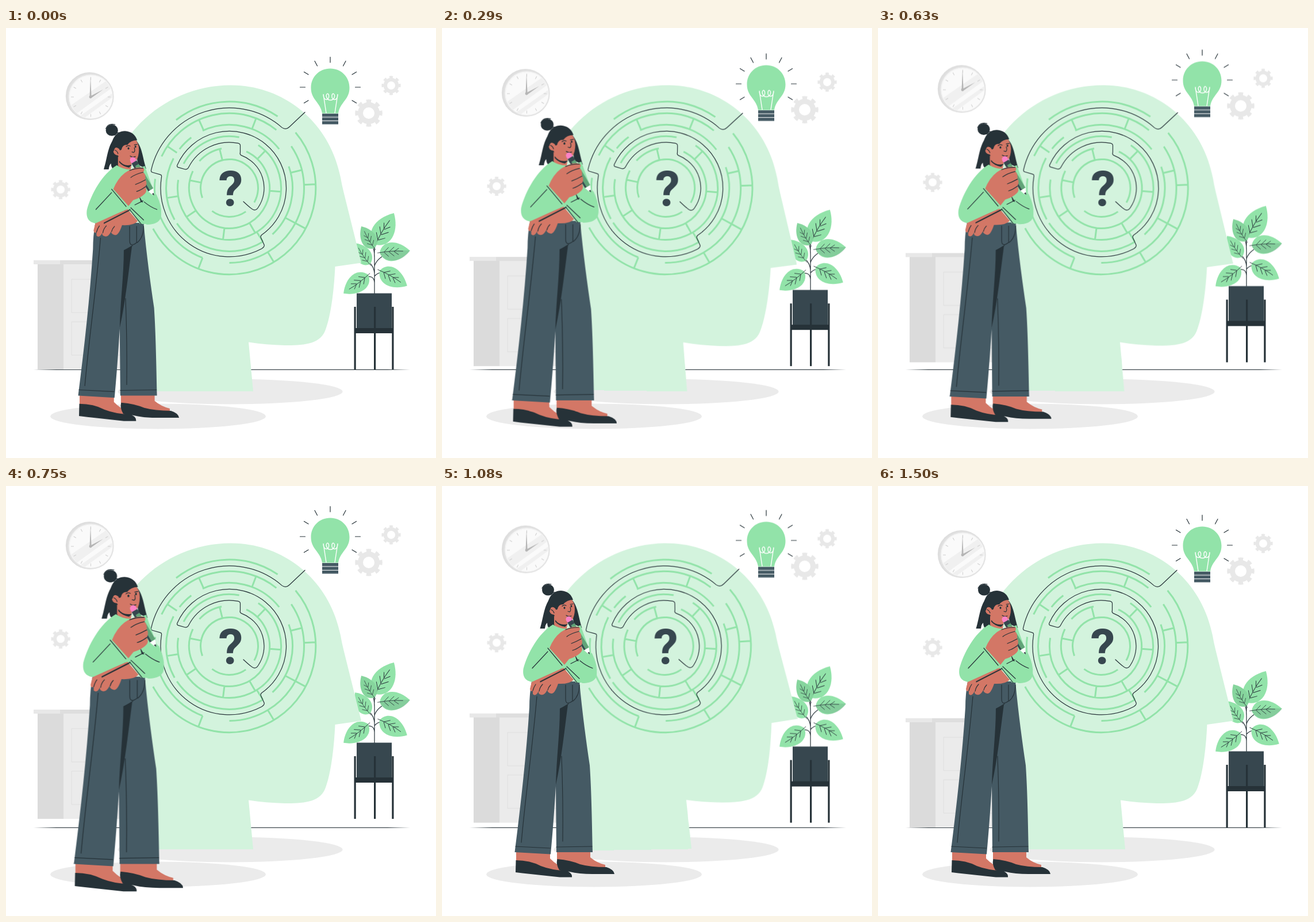
An HTML page that plays this animation: 748 px wide and 748 px high, repeating every 1540 ms.

```html
<!DOCTYPE html>
<html lang="en">
<head>
<meta charset="utf-8">
<title>Thinking through a maze</title>
<style>
html, body { margin: 0; width: 100%; height: 100%; overflow: hidden; background: #fff; }
svg { display: block; width: 100vw; height: 100vh; }

/* 37 pictures per loop; steps() keeps each one still */
.float, .sway, .beat { animation: 1540ms -5ms infinite; }
.float { animation-name: float; }
.sway { animation-name: sway; transform-origin: 394px 366px; }
.beat { animation-name: beat; transform-origin: 214px 427px; }
@keyframes float {
  0% { transform: translateY(0); animation-timing-function: steps(18); }
  48.649% { transform: translateY(-15px); animation-timing-function: steps(18); }
  97.297%, 100% { transform: translateY(0); }
}
@keyframes sway {
  0% { transform: rotate(0deg); animation-timing-function: steps(9); }
  24.324% { transform: rotate(1deg); animation-timing-function: steps(18); }
  72.973% { transform: rotate(-1deg); animation-timing-function: steps(9); }
  97.297%, 100% { transform: rotate(0deg); }
}
@keyframes beat {
  0% { transform: scale(1.012); animation-timing-function: steps(1); }
  2.703% { transform: scale(1.03); animation-timing-function: steps(2); }
  8.108% { transform: scale(1.086); animation-timing-function: steps(1); }
  10.811% { transform: scale(1.0931); animation-timing-function: steps(6); }
  27.027% { transform: scale(1.0097); animation-timing-function: steps(1); }
  29.73% { transform: scale(1); }
  37.838% { transform: scale(1); animation-timing-function: steps(1); }
  40.541% { transform: scale(1.0193); animation-timing-function: steps(2); }
  45.946% { transform: scale(1.075); animation-timing-function: steps(1); }
  48.649% { transform: scale(1.0973); animation-timing-function: steps(3); }
  56.757% { transform: scale(1.014); animation-timing-function: steps(1); }
  59.459%, 100% { transform: scale(1); }
}

.ink { fill: #263238; }
.slate { fill: #37474f; }
.denim { fill: #455a64; }
.green { fill: #92e3a9; }
.skin { fill: #d37766; }
.pale { fill: #ebebeb; }
.line { fill: none; stroke: #263238; stroke-width: 1.2; stroke-linecap: round; stroke-linejoin: round; }
.wall { fill: none; stroke: #92e3a9; stroke-width: 3; }
.gear { fill: none; stroke: #e8e8e8; }
.leaf .line { stroke-width: .9; }
text { font: 700 86px Roboto, "Open Sans", sans-serif; text-anchor: middle; }
</style>
</head>
<body>
<svg viewBox="0 0 748 748" xmlns="http://www.w3.org/2000/svg">
<defs>
  <g id="gear" class="gear">
    <circle r="14.5" stroke-width="9"/>
    <circle r="20.5" stroke-width="6.6" pathLength="16" stroke-dasharray="1 1" transform="rotate(-11.25)"/>
  </g>
  <g id="leaf" class="leaf">
    <path d="M0 0C6 -24 36 -25 60 0C38 23 8 24 0 0Z"/>
    <path class="line" d="M-4 0Q24 -3 46 0M9 -1L18 -9M19 -1L29 -9M29 -1L38 -6M9 0L17 8M19 0L28 8M29 0L37 6"/>
  </g>
  <linearGradient id="floor">
    <stop offset="0" stop-color="#263238" stop-opacity="0"/>
    <stop offset=".06" stop-color="#263238"/>
    <stop offset=".94" stop-color="#263238"/>
    <stop offset="1" stop-color="#263238" stop-opacity="0"/>
  </linearGradient>
  <clipPath id="face"><circle cx="148" cy="120" r="37"/></clipPath>
</defs>

<rect x="48" y="593.8" width="655" height="1.1" fill="url(#floor)"/>

<g class="float">
  <path class="pale" d="M100 411H206V594H100Z"/>
  <path fill="#dbdbdb" d="M55 411H100V594H55Z"/>
  <path fill="#e8e8e8" d="M48 404H94V411H48Z"/>
  <path fill="#dedede" d="M94 404H206V411H94Z"/>
  <path fill="none" stroke="#dedede" d="M114 437H200V495H114ZM114 511H200V569H114Z"/>

  <use href="#gear" x="631" y="148"/>
  <use href="#gear" transform="translate(670 100) scale(.7)"/>
  <use href="#gear" transform="translate(95 281) scale(.7)"/>

  <circle cx="145.3" cy="118.5" r="41.5" fill="#dedede"/>
  <circle cx="147.7" cy="119.5" r="39" fill="#f5f5f5"/>
  <circle cx="148" cy="120" r="37" fill="#fafafa"/>
  <path clip-path="url(#face)" fill="#f0f0f0" d="M105 140L180 88L190 100L114 155ZM119 160L190 110V117L126 164Z"/>
  <circle cx="147.5" cy="119.5" r="39.2" fill="none" stroke="#e3e3e3" stroke-width="2"/>
  <circle cx="147.5" cy="120" r="32" fill="none" stroke="#d0d0d0" stroke-width="5" pathLength="120" stroke-dasharray=".6 9.4" stroke-dashoffset=".3"/>
  <path fill="#b5b5b5" d="M145.5 121L147 84L148.7 121ZM146 119L169 107L148 122Z"/>
  <circle cx="147" cy="120" r="2.4" fill="#b5b5b5"/>

  <path class="green" d="M564 70.5C583 70.5 597.5 85 597.5 104C597.5 125 581 129 578 148.5H550C547 129 530.5 125 530.5 104C530.5 85 545 70.5 564 70.5Z"/>
  <path fill="none" stroke="#fff" stroke-width="1.4" d="M552 115L557 148M577 115L572 148M552 117C553 128 563 126 561.5 117C560 111 555.500 116 558 121C560 127 568.500 127 571 121C573 116 568.500 111 567 117C565.500 126 576 128 577 117"/>
  <path class="denim" d="M550 149H578V154.500H550ZM550 155.500H578V161H550ZM550 162H578V167.500H550Z"/>
  <path class="line" stroke-width="1.500" d="M564 50.500V60M537 57.500L541.500 66M591 57.500L586.500 66M518.500 76.500L526 81M609.500 76.500L602 81M511.500 103H520.500M616.500 103H607.500M518.500 130.500L526 126M609.500 130.500L602 126"/>

  <path class="line" stroke-width="1.7" d="M641 462V400Q640 388 643 372M641 398Q641 386 637 377M641 414Q645 400 668 390M641 427Q640 415 632 408M641 432Q648 423 660 426M641 443Q640 428 622 434"/>
  <g class="green">
    <use href="#leaf" transform="translate(643 377) rotate(-60) scale(1.06)"/>
    <use href="#leaf" transform="translate(641 383) rotate(-121) scale(.74)" fill="#86d59d"/>
    <use href="#leaf" transform="translate(650 391) rotate(-4) scale(.88 .9)"/>
    <use href="#leaf" transform="translate(633 411) rotate(-125) scale(.75)"/>
    <use href="#leaf" transform="translate(650 422) rotate(29) scale(.91)"/>
    <use href="#leaf" transform="translate(630 429) rotate(142.5) scale(.9)"/>
  </g>
  <path fill="#263238" fill-opacity=".12" d="M650 391Q676 386 703 387C690 408 660 411 650 391Z"/>
  <path class="slate" d="M610 461.5H671V523H610Z"/>
  <path class="ink" d="M606 522H674.5V531H606ZM605.5 485H608.7V594H605.5ZM640 485H643.2V594H640ZM671.3 485H674.5V594H671.3Z"/>
</g>

<ellipse class="pale" cx="390" cy="632.5" rx="195.5" ry="22"/>
<ellipse class="pale" cx="264.5" cy="675.5" rx="187.5" ry="22"/>

<g class="sway">
  <path fill="#d3f3dd" d="M391 99.5C480 99.5 562 160 582 260Q584 272 587 284L618 408.5L572.5 415C571 450 566 500 555 527C545 551 515 552 485 552Q450 551 422 546.5L430 632H215V480C180 430 170 380 170 321C170 199 269 99.5 391 99.5Z"/>
  <path id="maze" class="wall"/>
  <path id="route" class="line"/>
  <text class="slate" x="391" y="310">?</text>
</g>

<g class="beat">
  <path class="ink" d="M191 192C177 206 177 228 170.5 248H179Q180 240 183 238Q183 245 187 247L200 243L203 205ZM224 196C237 208 237 228 243.500 247L229 240Z"/>
  <ellipse class="ink" cx="184.500" cy="180.800" rx="10.500" ry="9.800"/>
  <path class="line" stroke-width="1" d="M174 178Q178 168 190 171M190 189Q193 184 197 185"/>

  <path class="skin" d="M129 636H188V648Q200 660 212 664V670H129ZM200 634H258V646Q270 656 284 659V668H200Z"/>
  <path class="ink" d="M128.500 651Q153 651 172 661Q190 668 214 669Q227 672 226 680.500H205L140 673.500L128 672ZM200.500 649Q224 651 240 658Q258 663 286 663Q299 667 300 675H262Q238 675 222 671L204 668Q198 658 200.500 649Z"/>

  <path class="denim" d="M156 340H239C244 395 251 445 257 486C260 530 261 590 262 637H199L198 522C195 570 192 608 189 640.500L126.500 637C137 555 147 465 152 385Q152 362 156 340Z"/>
  <path class="ink" d="M205 387L219 380C213 425 208 475 198 520C199 475 205 430 205 387Z"/>
  <path class="line" stroke-width="1" d="M165 366C158 450 145 540 138 620M128 627L188 630M199 628L261 627M208 470Q211 550 210 618M215 346V370Q215 383 227 374V346M206 388L220 379M239 346Q239 365 228 374"/>

  <path class="skin" d="M195 226L219 235L216 253Q200 252 195 241Z"/>
  <path class="green" d="M193 241C168 256 149 290 141.500 318C139 337 150 343 171 341L218 320L244 343C262 343 271 336 269 322C268 307 264 295 257 287L241 242Q213 255 193 241Z"/>
  <path class="skin" d="M156 341L211 316L229 337Q222 345 202 344Q196 362 190 361Q184 360 183 355Q178 365 172 363Q167 362 168 357Q163 367 158 362V356Q154 359 153 353Z"/>
  <path class="line" stroke-width=".9" d="M169 357Q170 350 175 345M184 355Q185 350 189 346M158 356Q160 349 163 345"/>
  <path class="green" d="M212 314L217 302L261 291Q271 312 269 326Q268 337 246 342H233Z"/>
  <path class="ink" d="M231 293L238 305L234 304Z"/>
  <path class="line" d="M215 317L235 342M217 314L239 335M240 304Q251 313 262 317M171 341L214 319M181 290L207 318M184 290L158 315M238 302L224 309"/>

  <path class="ink" d="M197 233Q205 244 219 240L214 245Q203 243 197 236Z"/>
  <path class="skin" d="M201 204L222 193Q231 202 231 214Q231 226 226 234Q220 241 208 237Q199 235 195 224Q186 223 187 214Q191 207 198 213Z"/>
  <path class="ink" d="M184 219C181 199 190 182 207 182Q223 183 228 198Q217 198 211 206Q203 205 201 214Q198 217 197 213Q190 207 188 216Z"/>
  <path class="line" stroke-width=".9" d="M209 209Q212 206 216 208M223 206L228 205M223 211Q225 217 222 219L219 218M190 215Q194 217 195 221M216 225Q220 228 225 226"/>
  <ellipse class="ink" cx="213" cy="212" rx="1.500" ry="2"/>
  <ellipse class="ink" cx="225" cy="209" rx="1.400" ry="2"/>

  <g transform="translate(220 231) rotate(59)">
    <path fill="#61a378" d="M8 -5H61V5H8Z"/>
    <path class="slate" d="M4 -5H12V5H4ZM8 2H61V5H8Z"/>
    <path fill="#fff" d="M61 -5L70 -1V2L61 5Z"/>
    <path class="ink" d="M68 -1.500L72 0L68 2Z"/>
    <path fill="#fb83c6" d="M5 -5Q-4 -6 -4 0Q-4 6 5 5Z"/>
  </g>
  <path class="skin" d="M187 282Q194 264 207 254Q223 243 238 245Q242 248 238 253Q243 256 242 265Q246 271 242 278Q246 285 241 290Q234 297 221 301L213 311Z"/>
  <path class="line" stroke-width=".9" d="M238 253Q225 256 217 262M242 266Q233 271 225 274M242 278Q234 284 227 286M215 250Q224 246 238 246"/>
  <path class="green" d="M184 280L215 315L170 333L157 315Z"/>
  <path class="line" d="M184 282L209 312M184 288L157 317M216 317L171 340"/>
</g>
</svg>

<script>
const cx = 388.5, cy = 278.4;
const at = (r, deg) => {
  const a = deg * Math.PI / 180;
  return `${cx + r * Math.cos(a)} ${cy + r * Math.sin(a)}`;
};
// arc from the current point, clockwise when b > a
const turn = (r, a, b) =>
  `A${r} ${r} 0 ${+(Math.abs(b - a) > 180)} ${+(b > a)} ${at(r, b)}`;
const arc = ([r, a, b]) => `M${at(r, a)}${turn(r, a, b)}`;
const bar = ([a, r]) => `M${at(r, a)}L${at(r + 20, a)}`;
const draw = (id, d) => document.getElementById(id).setAttribute('d', d);

// walls: radius, start angle, end angle
const arcs = [
  [150.3, 232, 304], [150.3, -40, 152],
  [130, 205, 309], [130, -34, 90], [130, 111, 187],
  [110, 150, 208], [110, 218, 233], [110, 245, 322], [110, -20, 47], [110, 58, 146],
  [90, 208, 281], [90, -56, 189],
  [70, 222, 259], [70, -65, 205],
  [50, 160, 390], [50, 55, 127]
];
// spokes: angle, inner radius
const bars = [
  [111, 130], [59, 130], [28, 130], [-2.5, 130],
  [-14, 110], [-69, 110], [246, 110], [214, 110], [28, 110],
  [171, 90], [58, 90],
  [146, 70], [97, 70], [60, 70], [4, 70], [-46, 70],
  [191, 50], [256, 50]
];
draw('maze', arcs.map(arc).join('') + bars.map(bar).join(''));

// the way out, from the bulb to the middle, with rounded corners
draw('route', [
  'M520 146.5L493 172',
  `Q487 178 ${at(139.5, -49)}`, turn(139.5, -49, -167),
  `Q${at(139.5, -168.5)} ${at(136, -168.5)}L${at(122, -169)}`,
  `Q${at(119.5, -169)} ${at(119.5, -171)}`, turn(119.5, 189, 62),
  `Q${at(119.5, 59)} ${at(116, 58.5)}L${at(102, 57.5)}`,
  `Q${at(99, 57)} ${at(99, 55)}`, turn(99, 55, -156),
  `Q${at(99, -158)} ${at(96, -158)}L${at(83, -157)}`,
  `Q${at(79.5, -156)} ${at(79.5, -153)}`, turn(79.5, -153, -79),
  `Q${at(79.5, -76)} ${at(76, -75.5)}L${at(65, -73)}`,
  `Q${at(60.5, -73)} ${at(60.5, -69)}`, turn(60.5, -69, 34),
  'Q435 318 430 316Q427 315 413 302'
].join(''));
</script>
</body>
</html>
```
